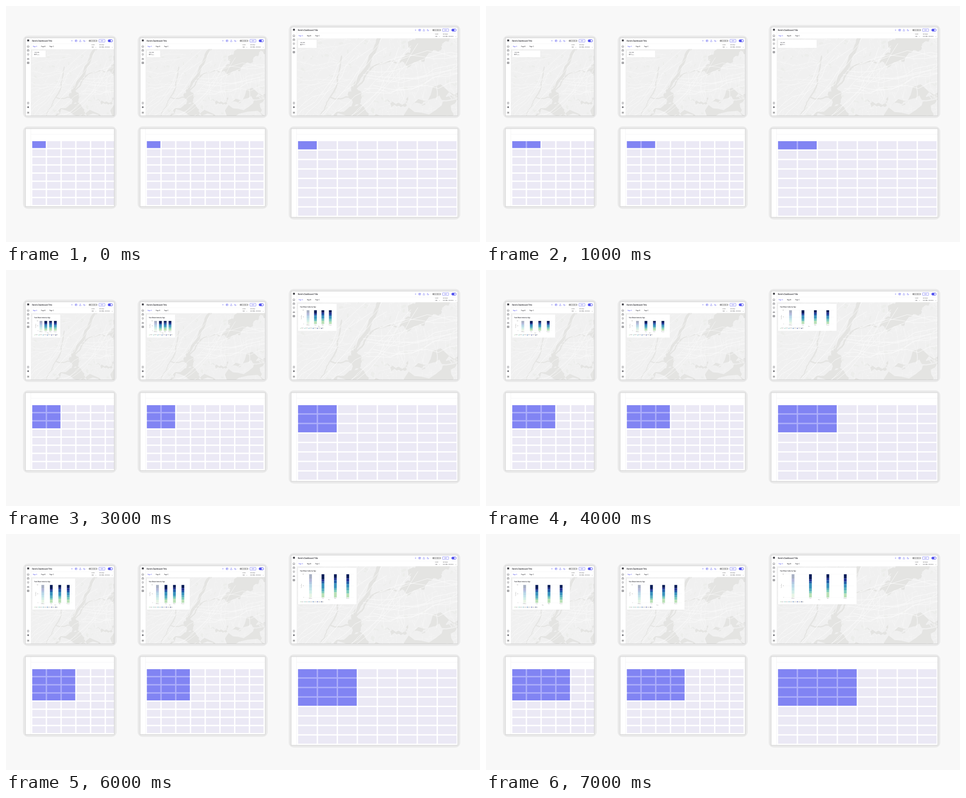
Recreate the animation shown at these times as an HTML page with a canvas. Size 1058 by 529 pixels, loop 8 s.

```html
<!DOCTYPE html>
<html lang="en">
<head>
<meta charset="utf-8">
<title>Responsive dashboard grid</title>
<style>
html, body { margin: 0; width: 100%; height: 100%; overflow: hidden; background: #f8f8f8; }
canvas { display: block; width: 1058px; height: 529px; }
</style>
</head>
<body>
<canvas id="stage"></canvas>
<script>
const W = 1058, H = 529, STEP = 1000;
const SIZES = [[1, 1], [2, 1], [2, 2], [2, 3], [3, 3], [2, 4], [3, 4], [4, 4]];
const END = 246, PANEL = 275, GRID = 303, GAP = 3;
const MAP_W = 266, MAP_H = 149;
const BLUE = '#5656ef', INK = '#25252b', GREY = '#5a5a60';
const LAND = '#f0f0f0', WATER = '#e4e4e2';
const SCALE = ['#081d58', '#253494', '#225ea8', '#3a93bd', '#58aebf', '#7fcdbb', '#b9e0b6'];
const RACES = ['All Riders', 'Asian', 'Black', 'Hispanic'];
const AGES = ['15-20', '20-25', '25-30', '30-45', '45-65', '65+'];
// Icons sit on a 4 by 4 box centred on the origin.
const ICONS = {
  home: 'M-2 2V-.4L0-2.2 2-.4V2ZM0 2V.5',
  image: 'M-2-1.3H2V1.8H-2ZM-1-1.4L-.5-2H.5L1-1.4M-.6.3H.6',
  pin: 'M0 2.2L-1.5.2A1.7 1.7 0 1 1 1.5.2ZM-.3-.7H.3',
  people: 'M-1.6-1H-.4M.4-1H1.6M-2 .2H2V1.6H-2Z',
  table: 'M-2-1.9H2V1.9H-2ZM-2-.5H2M-2 .8H2',
  note: 'M-1.6-2H1.6V2H-1.6ZM-.7 0H.7',
  gear: 'M-1.2-1.2H1.2V1.2H-1.2ZM-1.8 0H1.8M0-1.8V1.8',
  plus: 'M-1.2 0H1.2M0-1.2V1.2',
  layout: 'M-2-2H2V2H-2ZM-2-.7H2M-.6-.7V2',
  upload: 'M-2 .8V2H2V.8M0 1V-2.1M-1.2-1L0-2.2 1.2-1',
  moon: 'M-.8-1.8A2 2 0 1 0 1.8.8Q-1 .9-.8-1.8Z',
  down: 'M-.7-.3L0 .4 .7-.3'
};

function makeScreen(l, r, t, px, py, zoom) {
  return { l, r, t, px, py, zoom, x: l + 15.3, cw: px - GAP, ch: py - GAP, gridEnd: PANEL + END - t };
}
const SCREENS = [
  makeScreen(43.4, 241.5, 71.5, 32.9, 18.25, 1),
  makeScreen(299.3, 578.5, 71.5, 32.9, 18.25, 1),
  makeScreen(636.6, 1008.5, 47.5, 44.6, 21.25, 1.35)
];

const dpr = window.devicePixelRatio || 1;
function setup(c) {
  c.width = W * dpr;
  c.height = H * dpr;
  const ctx = c.getContext('2d');
  ctx.scale(dpr, dpr);
  return ctx;
}
const stage = setup(document.getElementById('stage'));
const back = document.createElement('canvas');
let g = setup(back);
let seed = 1;
const rnd = () => (seed = seed * 16807 % 2147483647) / 2147483647;

function rect(x, y, w, h, fill) {
  g.fillStyle = fill;
  g.fillRect(x, y, w, h);
}
function round(x, y, w, h, r, fill, stroke) {
  g.beginPath();
  g.roundRect(x, y, w, h, r);
  g.fillStyle = fill;
  g.fill();
  if (!stroke) return;
  g.strokeStyle = stroke;
  g.lineWidth = .6;
  g.stroke();
}
function dot(x, y, r, fill) {
  g.beginPath();
  g.arc(x, y, r, 0, 7);
  g.fillStyle = fill;
  g.fill();
}
function line(x1, y1, x2, y2, color, lw = .5) {
  g.beginPath();
  g.moveTo(x1, y1);
  g.lineTo(x2, y2);
  g.strokeStyle = color;
  g.lineWidth = lw;
  g.stroke();
}
function icon(name, x, y, color, lw = .55) {
  g.save();
  g.translate(x, y);
  g.strokeStyle = color;
  g.lineWidth = lw;
  g.stroke(new Path2D(ICONS[name]));
  g.restore();
}
// Drawn at ten times the size so small type keeps its proportions.
function text(s, x, y, size, { color = INK, weight = 400, align = 'left', track = 0, turn = 0 } = {}) {
  g.save();
  g.translate(x, y);
  g.rotate(turn);
  g.scale(.1, .1);
  g.font = `${weight} ${size * 10}px Inter, "Open Sans", sans-serif`;
  g.letterSpacing = track * size * 10 + 'px';
  g.textAlign = align;
  g.fillStyle = color;
  g.fillText(s, 0, size * 3.6);
  g.restore();
}

// Splits each segment and shifts the middle, for ragged shores and winding roads.
function ragged(pts, amount, depth) {
  if (!depth) return pts;
  const out = [pts[0]];
  for (let i = 1; i < pts.length; i++) {
    const [ax, ay] = pts[i - 1], [bx, by] = pts[i], k = (rnd() - .5) * amount;
    out.push([(ax + bx) / 2 + (by - ay) * k, (ay + by) / 2 - (bx - ax) * k], pts[i]);
  }
  return ragged(out, amount, depth - 1);
}
function trace(pts) {
  g.beginPath();
  for (const [x, y] of pts) g.lineTo(x, y);
}
function water(...pts) {
  trace(ragged([...pts, pts[0]], .75, 3));
  g.fillStyle = WATER;
  g.fill();
}
function stream(color, lw, ...pts) {
  trace(ragged(pts, .22, 3));
  g.strokeStyle = color;
  g.lineWidth = lw;
  g.stroke();
}
function ray(x, y, len, a, color, lw) {
  stream(color, lw, [x, y], [x + len * Math.cos(a), y + len * Math.sin(a)]);
}
function islands(n, x, y, w, h, slope) {
  for (let i = 0; i < n; i++) {
    const k = rnd(), ix = x + k * w;
    ray(ix, y + k * slope + rnd() * h, 2 + rnd() * 4, rnd() * 3, LAND, 1.2);
  }
}

function drawMap() {
  seed = 29;
  g.lineJoin = g.lineCap = 'round';
  rect(0, 0, MAP_W, MAP_H, LAND);
  for (let i = 0; i < 60; i++) ray(rnd() * MAP_W, rnd() * MAP_H, 2 + rnd() * 4, rnd() * 6, '#ecedeb', 1 + rnd() * 3);
  // streets lean north-east in the west and run level in the east
  for (let i = 0; i < 560; i++) {
    const x = rnd() * MAP_W, turn = rnd() < .5 ? Math.PI / 2 : 0;
    ray(x, rnd() * MAP_H, 4 + rnd() * 14, (x < 120 ? -.95 : -.2) + turn + (rnd() - .5) * .6, 'rgba(251,251,251,.7)', .35);
  }
  // rivers, then harbour, sound and south shore
  stream(WATER, 6, [147, -4], [130, 27], [103, 75], [94, 96]);
  stream(WATER, 2.6, [97, 94], [121, 63], [154, 48]);
  stream(WATER, 1.1, [121, 62], [136, 18]);
  stream(WATER, 2.2, [74, 40], [55, 108], [90, 108]);
  stream(WATER, 1.6, [55, 108], [46, 128], [34, 149]);
  water([91, 89], [104, 97], [95, 123], [118, 140], [122, 151], [54, 151], [87, 124], [84, 104]);
  water([150, 50], [180, 36], [188, 14], [208, -2], [268, -2], [268, 12], [242, 18], [234, 32], [216, 38], [198, 50], [178, 51]);
  water([150, 112], [184, 106], [182, 122], [156, 125]);
  water([190, 122], [222, 112], [268, 99], [268, 109]);
  water([113, 151], [116, 139], [185, 125], [268, 108], [268, 151]);
  islands(7, 154, 112, 24, 8, 0);
  islands(18, 195, 117, 70, 5, -14);
  stream(LAND, 1.8, [138, 137], [182, 126]);
  stream(LAND, 1.8, [188, 126], [268, 109]);
  // highways
  for (let i = 0; i < 9; i++) {
    ray(i * 13 - 20, MAP_H, 150 + rnd() * 50, -1 + rnd() * .25, '#fbfbfb', .7);
    ray(108 + rnd() * 30, 52 + i * 6, 160, -.18 + rnd() * .1, '#fbfbfb', .7);
    ray(140 + i * 14, 50 + rnd() * 8, 58, 1.2 + rnd() * .6, '#fafafa', .5);
    ray(0, 10 + i * 13, 90, -.5 + rnd() * .7, '#fafafa', .5);
  }
  g.lineCap = 'butt';
  g.lineJoin = 'miter';
}

function frame(s, top, end) {
  const w = s.r - s.l, m = 5.4;
  round(s.l - m, top - m + .5, w + m * 2, end - top + m * 2 - 1, 11, '#e9e9e9');
  rect(s.l, top, w, end - top, '#fff');
}
function edge(s, top, end) {
  g.strokeStyle = '#b4b4b4';
  g.lineWidth = .55;
  g.strokeRect(s.l, top, s.r - s.l, end - top);
}

function sidebar(x, t) {
  rect(x - 2, t + 3.6, 4.2, 4.2, '#44444a');
  ['home', 'image', 'pin', 'people', 'table'].forEach((n, i) => icon(n, x, t + 18.7 + i * 9.3, GREY, .65));
  icon('note', x, 217.5, GREY);
  icon('gear', x, 226.8, GREY, .8);
  dot(x, 239.1, 3.1, '#dcdcdc');
  text('GM', x, 239.1, 1.8, { align: 'center', weight: 600 });
}

function picker(label, value, x, t, arrow) {
  text(label, x, t + 15.9, 2.05, { color: '#555' });
  text(value, x, t + 21, 2.1);
  icon('down', arrow, t + 21, INK, .35);
}
function toolbar(r, t) {
  const y = t + 6.5;
  ['plus', 'layout', 'upload', 'moon'].forEach((n, i) => icon(n, r - 94.4 + i * 9.3, y, BLUE));
  line(r - 61.6, y - 2.4, r - 61.6, y + 2.4, '#e8e8e8');
  round(r - 57.3, y - 2.9, 20.3, 5.8, 2.9, '#dedede');
  ['GM', 'J', 'A', '+2'].forEach((s, i) => {
    const x = r - 54.4 + i * 4.85;
    dot(x, y, 2.5, i % 2 ? '#d6d6d6' : '#cdcdcd');
    text(s, x, y, 1.9, { align: 'center', weight: 600 });
  });
  round(r - 34, y - 3, 13.4, 6, .5, '#fff', BLUE);
  text('Share', r - 27.3, y, 2.4, { align: 'center', color: BLUE, weight: 500 });
  round(r - 14.2, y - 3, 11, 6, 3, BLUE);
  dot(r - 6.1, y, 2.1, '#fff');
  picker('Column', '1 Day', r - 51, t, r - 41);
  picker('Date Range', '01/01/1996 - 01/01/2023', r - 33.6, t, r - 4.4);
}

function dashboard(s) {
  const { l, r, t } = s, mapX = l + 12.5, mapY = t + 25;
  frame(s, t, END);
  g.save();
  g.beginPath();
  g.rect(mapX, mapY, r - mapX, END - mapY);
  g.clip();
  g.translate(mapX, (mapY + END) / 2);
  g.scale(s.zoom, s.zoom);
  g.translate(0, -MAP_H / 2);
  drawMap();
  g.restore();
  line(mapX, t, mapX, END, '#e8e8e8');
  line(mapX, t + 13, r, t + 13, '#eeeeee');
  sidebar(l + 6, t);
  text('Remi\u2019s Dashboard Title', s.x - .5, t + 6.5, 4.4, { weight: 500, track: -.035 });
  ['A', 'B', 'C'].forEach((p, i) =>
    text('Page ' + p, l + 16.6 + i * 18.6, t + 19.6, 2.8, { weight: 500, color: i ? INK : BLUE }));
  toolbar(r, t);
  edge(s, t, END);
}

function cells(s, cols, rows, fill) {
  for (let j = 0; j < rows; j++)
    for (let i = 0; i < cols; i++)
      rect(s.x + i * s.px, GRID + j * s.py, s.cw, s.ch, fill);
}
function gridPanel(s) {
  frame(s, PANEL, s.gridEnd);
  line(s.l + 12, PANEL, s.l + 12, s.gridEnd, '#e8e8ea');
  line(s.l + 12, PANEL + 12.4, s.r, PANEL + 12.4, '#ebebed');
  g.save();
  g.beginPath();
  g.rect(s.l, PANEL, s.r - s.l, s.gridEnd - PANEL);
  g.clip();
  cells(s, 8, 8, '#ebe9f5');
  g.restore();
  edge(s, PANEL, s.gridEnd);
}

function visits(x, c) {
  text('Total Visits', x + 4.5, c - 3, 2.15);
  text('9.7', x + 4.5, c + 1.4, 3.6, { weight: 600 });
  text('million', x + 10.4, c + 1.8, 1.8);
}
function residents(x, c) {
  text('Total Residents', x + 4.5, c - 6.8, 3, { weight: 600 });
  text('150,000', x + 4.2, c + 3.1, 8.8, { weight: 500 });
  text('people', x + 39.6, c + 7.2, 2.9);
}
// Share of each age band: an even split swayed a little per bar.
function shares(bar) {
  const raw = SCALE.map((_, i) => 1 + .4 * Math.cos(i * 2.1) + .25 * Math.sin(i * 1.7 + bar * 2));
  const sum = raw.reduce((a, b) => a + b);
  return raw.map(v => v / sum);
}
function chart(x, y, w, h) {
  const top = y + 14.5, end = y + h - 15.5, left = x + 14, right = x + w - 6;
  const step = (right - left) / 4, tall = end - top;
  const label = { color: '#666', align: 'center' };
  text('Fare Share Index by Age', x + 4.5, y + 6.8, 3.05, { weight: 600 });
  ['100', '50', '0'].forEach((s, i) => {
    const ty = top + tall * i / 2;
    line(left, ty, right, ty, '#eeeeee', .35);
    text(s, left - 1, ty, 1.7, { color: '#666', align: 'right' });
  });
  text('Fare Share', x + 7.2, top + tall / 2, 1.8, { ...label, turn: -Math.PI / 2 });
  RACES.forEach((race, b) => {
    const cx = left + step * (b + .5);
    let py = top;
    g.globalAlpha = b ? 1 : .35;
    shares(b).forEach((p, i) => {
      rect(cx - 3.1, py, 6.2, p * tall, SCALE[i]);
      py += p * tall;
    });
    g.globalAlpha = 1;
    text(race, cx, end + 2.2, 1.65, label);
  });
  text('Race', (left + right) / 2, end + 5.6, 1.8, label);
  AGES.forEach((age, i) => {
    const lx = x + 5.5 + i * 9.4, ly = end + 9.7;
    dot(lx, ly, .95, SCALE[Math.round(6 - i * 1.2)]);
    text(age, lx + 1.6, ly, 1.8, { color: '#555' });
  });
}

function card(s, cols, rows) {
  const y = s.t + 28.2, w = (cols - 1) * s.px + s.cw, h = (rows - 1) * s.py + s.ch;
  g.save();
  g.shadowColor = 'rgba(0,0,0,.06)';
  g.shadowBlur = 2 * dpr;
  rect(s.x, y, w, h, '#fff');
  g.restore();
  if (rows === 1) visits(s.x, y + h / 2);
  else if (rows === 2) residents(s.x, y + h / 2);
  else chart(s.x, y, w, h);
  rect(s.x, GRID, w, h, '#adaffa');
  cells(s, cols, rows, '#8184f3');
}

rect(0, 0, W, H, '#f8f8f8');
for (const s of SCREENS) {
  dashboard(s);
  gridPanel(s);
}
g = stage;

let shown = -1;
function tick() {
  const now = Math.floor(performance.now() / STEP) % SIZES.length;
  if (now !== shown) {
    shown = now;
    g.drawImage(back, 0, 0, W, H);
    for (const s of SCREENS) card(s, ...SIZES[now]);
  }
  requestAnimationFrame(tick);
}
tick();
</script>
</body>
</html>
```
